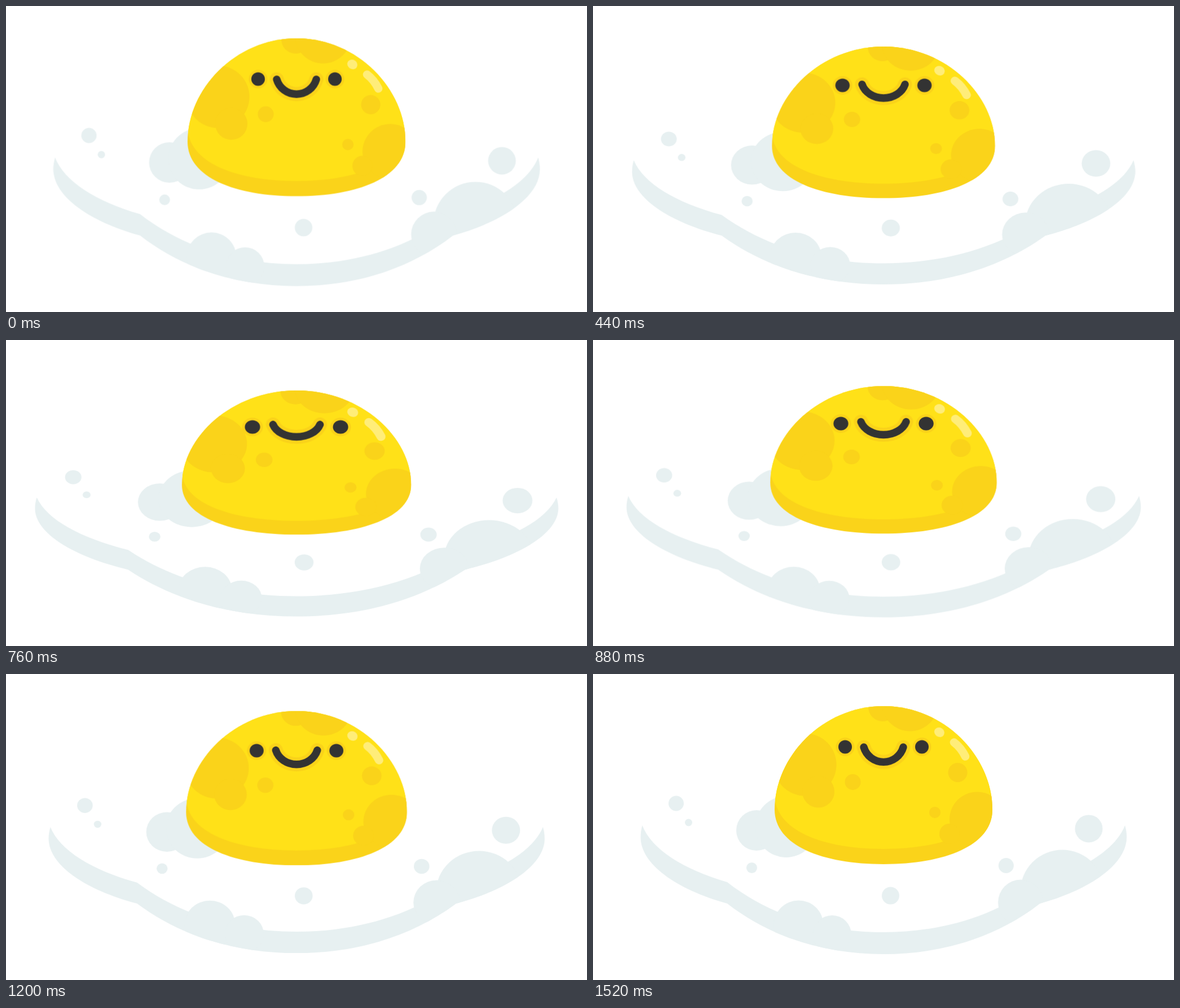
An HTML page that plays this animation: 1030 px wide and 544 px high, repeating every 1.56 s.

```html
<!DOCTYPE html>
<html lang="en">
<head>
<meta charset="utf-8">
<title>Bouncing egg</title>
<style>
  html, body { margin: 0; width: 100%; height: 100%; overflow: hidden; background: #fff; }
  svg { display: block; width: 100vw; height: 100vh; }

  .white { fill: #e7f0f1; }
  .spots { fill: #fad31a; }
  .light { fill: #ffe118; }
  .shine { fill: #ffed79; }
  .ink { fill: #333; }
  .mouth path {
    fill: none;
    stroke-linecap: round;
    stroke-width: 13.4px;
    stroke: #333;
    vector-effect: non-scaling-stroke;
  }
  .mouth .halo { stroke: #fad31a; stroke-width: 25px; }

  /* Every part shares one squash, out and back */
  .move {
    transform-origin: var(--o);
    animation: squash 780ms cubic-bezier(.333, .117, .667, .45) -31ms infinite alternate;
  }
  @keyframes squash {
    from { transform: translate(0, 0) scale(1, 1); }
    to { transform: translate(var(--t, 0px, 0px)) scale(var(--s)); }
  }
  .white { --o: 515px 412px; --s: 1.079, .922; }
  .yolk { --o: 515px 430px; --s: 1.054, .91; }
  .eye-l { --o: 447px 129.6px; --t: -10.3px, 25.8px; --s: 1.13, 1; }
  .eye-r { --o: 583px 129.6px; --t: 10.3px, 25.8px; --s: 1.13, 1; }
  .mouth { --o: 515px 130px; --t: 0px, 20.8px; --s: 1.195, .825; }
  .dot { --o: 614px 103.5px; --t: .7px, 25.6px; --s: 1.08, .98; }
  .bar { --o: 632.5px 114.5px; --t: 2.6px, 25.2px; --s: 1.09, 1.026; }
</style>
</head>
<body>
<svg viewBox="0 0 1030 544" preserveAspectRatio="none">
  <defs>
    <path id="dome" d="M322 241 C322 148 406 57 515 57 S708 148 708 241 C708 305 623 338 515 338 S322 305 322 241Z"/>
    <clipPath id="inDome"><use href="#dome"/></clipPath>
    <clipPath id="inWhite">
      <path d="M85 200 V290 C85 338 148 383 238 408 C316 469 413 498 515 498 S714 469 792 408 C882 383 946 338 946 290 V200Z"/>
    </clipPath>
  </defs>

  <g class="white move">
    <path d="M87.500 269 C85.500 276 84.500 283 84.500 290 C84.500 338 148 383 238 408
      C316 469 413 498 515 498 S714 469 792 408
      C882 383 946 338 946 290 C946 283 945 276 943 269
      C926 312 870 347 792 370 C714 431 617 459 515 459
      S316 431 238 370 C160 347 104 312 87.500 269Z"/>
    <g clip-path="url(#inWhite)">
      <circle cx="364.500" cy="446.500" r="44"/>
      <circle cx="424" cy="463" r="34"/>
      <circle cx="832" cy="387" r="74.500"/>
      <circle cx="758.500" cy="406" r="40.500"/>
    </g>
    <circle cx="290" cy="278" r="36"/>
    <circle cx="342.500" cy="271.500" r="54.500"/>
    <circle cx="147.500" cy="230" r="13.500"/>
    <circle cx="169.500" cy="264" r="6.500"/>
    <circle cx="281.500" cy="344.500" r="9.500"/>
    <circle cx="527.500" cy="394" r="15.500"/>
    <circle cx="732.300" cy="340.500" r="13.500"/>
    <circle cx="878.800" cy="275" r="24.500"/>
  </g>

  <g class="yolk spots move">
    <use href="#dome"/>
    <g clip-path="url(#inDome)">
      <path class="light" d="M300 0 H730 V214 H708 C708 278 623 311 515 311 S322 278 322 214 H300Z"/>
      <circle cx="376" cy="161" r="55.500"/>
      <circle cx="399.500" cy="209" r="28.500"/>
      <circle cx="460.500" cy="192" r="14"/>
      <circle cx="646.500" cy="175" r="17"/>
      <circle cx="606" cy="246" r="10"/>
      <circle cx="681" cy="258.500" r="49"/>
      <circle cx="632" cy="284" r="18"/>
      <circle cx="513.500" cy="58.500" r="25.500"/>
      <circle cx="562" cy="51.500" r="50"/>
    </g>
  </g>

  <g class="eye-l move">
    <circle class="spots" cx="447" cy="129.600" r="16.500"/>
    <circle class="ink" cx="447" cy="129.600" r="12"/>
  </g>
  <g class="eye-r move">
    <circle class="spots" cx="583" cy="129.600" r="16.500"/>
    <circle class="ink" cx="583" cy="129.600" r="12"/>
  </g>
  <g class="mouth move">
    <path class="halo" d="M480 130 A36.400 36.400 0 0 0 550 130"/>
    <path d="M480 130 A36.400 36.400 0 0 0 550 130"/>
  </g>

  <g class="dot move">
    <ellipse class="shine" cx="614" cy="103.500" rx="9.300" ry="8.200" transform="rotate(35 614 103.500)"/>
  </g>
  <g class="bar move">
    <path d="M640 121.500 Q652.500 131 660 146.500" fill="none" stroke="#ffed79" stroke-width="14.600" stroke-linecap="round"/>
  </g>
</svg>
</body>
</html>
```
